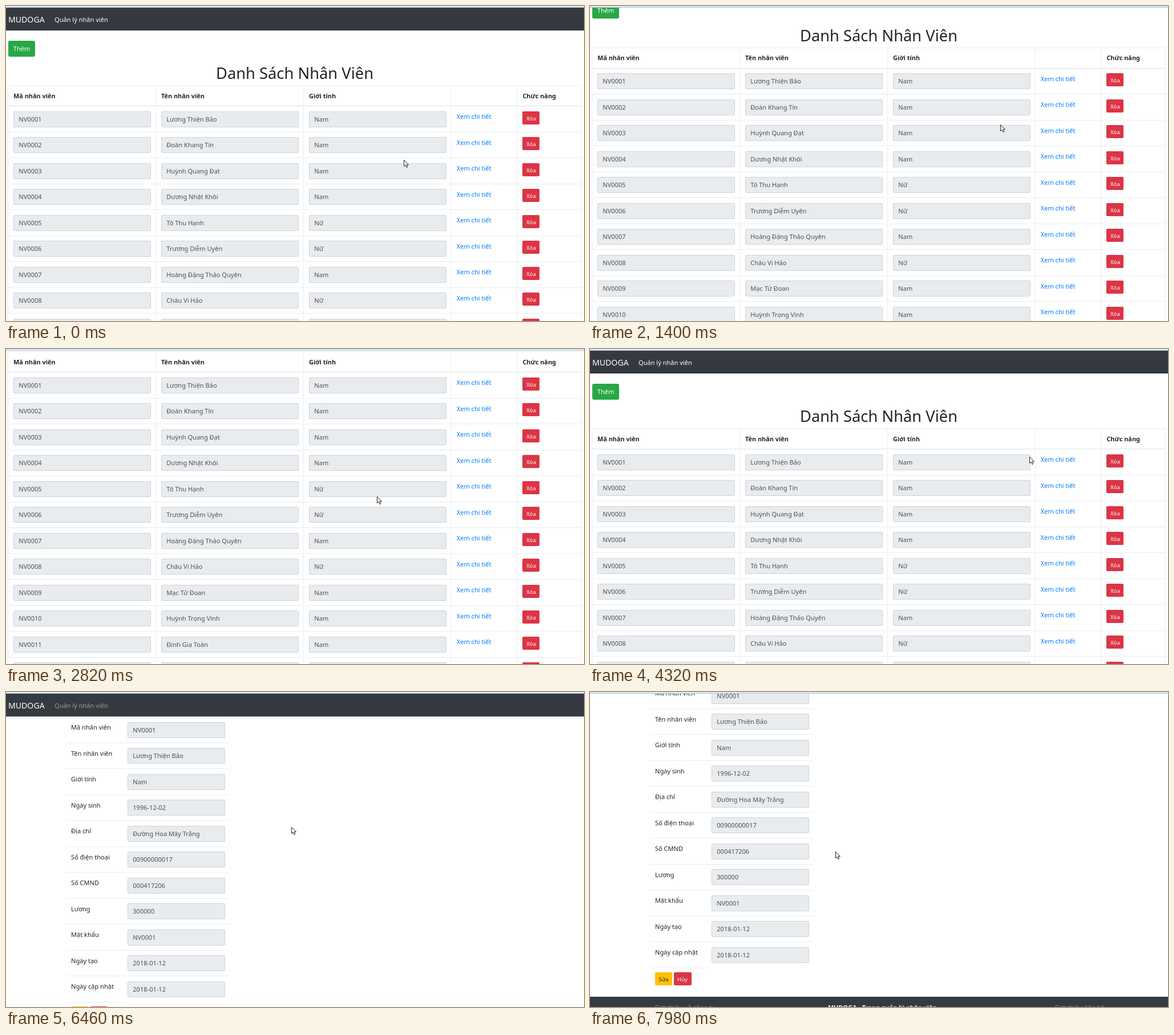
Recreate the animation shown at these times as an HTML page. Size 1013 by 553 pixels, loop 8 s.

```html
<!DOCTYPE html>
<html lang="vi">
<head>
<meta charset="utf-8">
<title>Quản lý nhân viên</title>
<style>
html, body { margin: 0; width: 100%; height: 100%; overflow: hidden; background: #fff; }
body { position: relative; font: 11.05px "Noto Sans", "Open Sans", sans-serif; color: #212529; }
div, svg { position: absolute; box-sizing: border-box; white-space: nowrap; }
.bar { background: #343a40; color: #fff; }
.brand { font-size: 14.1px; }
.dim { color: #999c9f; }
.bold { font-size: 10.9px; font-weight: bold; }
.title { font-size: 27.3px; text-align: center; }
.line { background: #e9ecef; }
.line.strong { background: #dee2e6; }
.input { background: #e9ecef; color: #495057; border-radius: 3px; padding-left: 9.3px; box-shadow: inset 0 0 0 1px #ced4da; }
.btn { border-radius: 3px; text-align: center; color: #fff; }
.small { font-size: 9.6px; padding-top: 1px; border-radius: 2px; }
.green { background: #28a745; }
.green.hover { background: #218838; }
.red { background: #dc3545; }
.yellow { background: #ffc107; color: #212529; }
.link { color: #007bff; }
.link.hover { color: #0056b3; text-decoration: underline; }
.strip { background: #dfebf7; border-bottom: 1px solid #b0c4de; }
svg { left: 0; top: 0; overflow: visible; fill: #fff; stroke: #222; }
</style>
</head>
<body>
<script>
const ROW = 45.5, LINE = 17.6, FIELD = 28, SMALL = 23;

function add(parent, x, y, w, h, cls, text = '') {
  const e = document.createElement('div');
  e.className = cls;
  e.textContent = text;
  e.style.cssText = `left:${x}px;top:${y}px;width:${w}px;height:${h}px;line-height:${h}px`;
  return parent.appendChild(e);
}

function makePage(footerTop, linkClass) {
  const page = add(document.body, 0, 0, 1013, 900, '');
  add(page, 0, 2.6, 1013, 40.4, 'bar');
  add(page, 4, 14, 80, 19, 'bar brand', 'MUDOGA');
  add(page, 85, 14.6, 100, LINE, 'bar ' + linkClass, 'Quản lý nhân viên');
  add(page, 0, footerTop, 1013, 120, 'bar');
  const y = footerTop + 10.4;
  add(page, 113, y, 120, LINE, 'bar dim', 'Giới thiệu về công ty');
  add(page, 417, y, 220, LINE, 'bar bold', 'MUDOGA - Trang quản lý nhân viên');
  add(page, 814, y, 110, LINE, 'bar dim', 'Giới thiệu liên hệ');
  return page;
}

// Employee list
const list = makePage(733.8, '');
const addBtn = add(list, 4, 60.8, 47, FIELD, 'btn green', 'Thêm');
add(list, 306, 99, 400, 37, 'title', 'Danh Sách Nhân Viên');
[3, 262, 521, 780, 896, 1008].forEach(x => add(list, x, 139.4, 1, 583, 'line'));
add(list, 3, 139.4, 1006, 1, 'line');
add(list, 3, 175.4, 1006, 1, 'line strong');
['Mã nhân viên', 'Tên nhân viên', 'Giới tính']
  .forEach((s, c) => add(list, 13 + 259 * c, 148.9, 100, LINE, 'bold', s));
add(list, 905.4, 148.9, 100, LINE, 'bold', 'Chức năng');

const people = ['Lương Thiện Bảo', 'Đoàn Khang Tín', 'Huỳnh Quang Đạt', 'Dương Nhật Khôi',
  'Tô Thu Hạnh', 'Trương Diễm Uyên', 'Hoàng Đặng Thảo Quyên', 'Châu Vi Hảo',
  'Mạc Tử Đoan', 'Huỳnh Trọng Vinh', 'Đinh Gia Toàn', 'Trịnh Thanh Khương'];
const women = [4, 5, 7];
const links = people.map((name, i) => {
  const y = 184.6 + ROW * i;
  const code = 'NV' + String(i + 1).padStart(4, '0');
  [code, name, women.includes(i) ? 'Nữ' : 'Nam']
    .forEach((s, c) => add(list, 13 + 259 * c, y, 241, FIELD, 'input', s));
  add(list, 905.4, y, 30, SMALL, 'btn small red', 'Xóa');
  add(list, 3, y + 36.3, 1006, 1, 'line');
  return add(list, 789.7, y + 0.7, 61, LINE, 'link', 'Xem chi tiết');
});

// Employee details
const detail = makePage(595, 'dim');
const fields = [['Mã nhân viên', 'NV0001'], ['Tên nhân viên', people[0]], ['Giới tính', 'Nam'],
  ['Ngày sinh', '1996-12-02'], ['Địa chỉ', 'Đường Hoa Mây Trắng'], ['Số điện thoại', '00900000017'],
  ['Số CMND', '000417206'], ['Lương', '300000'], ['Mật khẩu', 'NV0001'],
  ['Ngày tạo', '2018-01-12'], ['Ngày cập nhật', '2018-01-12']];
fields.forEach(([label, value], i) => {
  const y = 52.6 + ROW * i;
  add(detail, 114, y + 0.7, 90, LINE, '', label);
  add(detail, 213, y, 171, FIELD, 'input', value);
  add(detail, 106, y + 36.2, i < 10 ? 286 : 98, 1, 'line');
});
add(detail, 114, 552.4, 30, SMALL, 'btn small yellow', 'Sửa');
add(detail, 146.5, 552.4, 31, SMALL, 'btn small red', 'Hủy');

add(document.body, 0, 0, 1013, 3, 'strip');
document.body.insertAdjacentHTML('beforeend', `<svg width="12" height="16">
  <path id="arrow" d="M.5 .5V11.5L3 9.2L5 13.5L6.8 12.7L5 8.6H8.5Z"/>
  <path id="hand" d="M3.5 8V1.5Q4.5 0 5.5 1.5V5Q7 4.5 7.5 5.5Q9 5 9.5 6Q11 6 11 7.5V11L9.5 15H4.5L1 10Q.5 8.5 1.5 8.2Z"/></svg>`);
const cursor = document.querySelector('svg');
const [arrow, hand] = cursor.children;

// Each move: first step, last step, goal
const STEP = 140, DETAIL_AT = 5260;
const cursorMoves = [[130, 550, 734, 177], [820, 950, 719, 208], [2510, 2820, 650, 259],
  [2960, 3780, 25, 72], [3920, 4320, 770, 189], [4450, 4580, 807, 204], [4730, 4850, 815, 198],
  [DETAIL_AT, 6040, 500, 237], [6620, 7410, 430, 280]];
const scrollMoves = [[1260, 1400, 66.5], [1550, 1850, 196.5], [1980, 2110, 240],
  [2510, 2820, 135], [2960, 3250, 0], [7690, 7980, 60]];

// Advances in equal jumps of about STEP ms
function follow(moves, t, pos) {
  for (const [start, end, ...goal] of moves) {
    if (t < start) break;
    const n = Math.round((end - start) / STEP);
    const k = Math.min(n, Math.floor((t - start) / (end - start) * n + 1e-6));
    pos = goal.map((g, i) => pos[i] + (g - pos[i]) * (k + 1) / (n + 1));
  }
  return pos;
}

function draw(t) {
  const [scroll] = follow(scrollMoves, t, [0]);
  const [x, y] = follow(cursorMoves, t, [697, 270]).map(Math.round);
  const onDetail = t >= DETAIL_AT;
  const over = e => !onDetail && x >= e.offsetLeft && x < e.offsetLeft + e.offsetWidth &&
    y + scroll >= e.offsetTop && y + scroll < e.offsetTop + e.offsetHeight;
  list.style.display = onDetail ? 'none' : '';
  detail.style.display = onDetail ? '' : 'none';
  list.style.top = detail.style.top = -scroll + 'px';
  const onLink = over(links[0]);
  links[0].classList.toggle('hover', onLink);
  addBtn.classList.toggle('hover', over(addBtn));
  arrow.style.display = onLink ? 'none' : '';
  hand.style.display = onLink ? '' : 'none';
  cursor.style.left = x + 'px';
  cursor.style.top = y + 'px';
}

const start = performance.now();
function loop() {
  draw((performance.now() - start) % 8000);
  requestAnimationFrame(loop);
}
loop();
</script>
</body>
</html>
```
